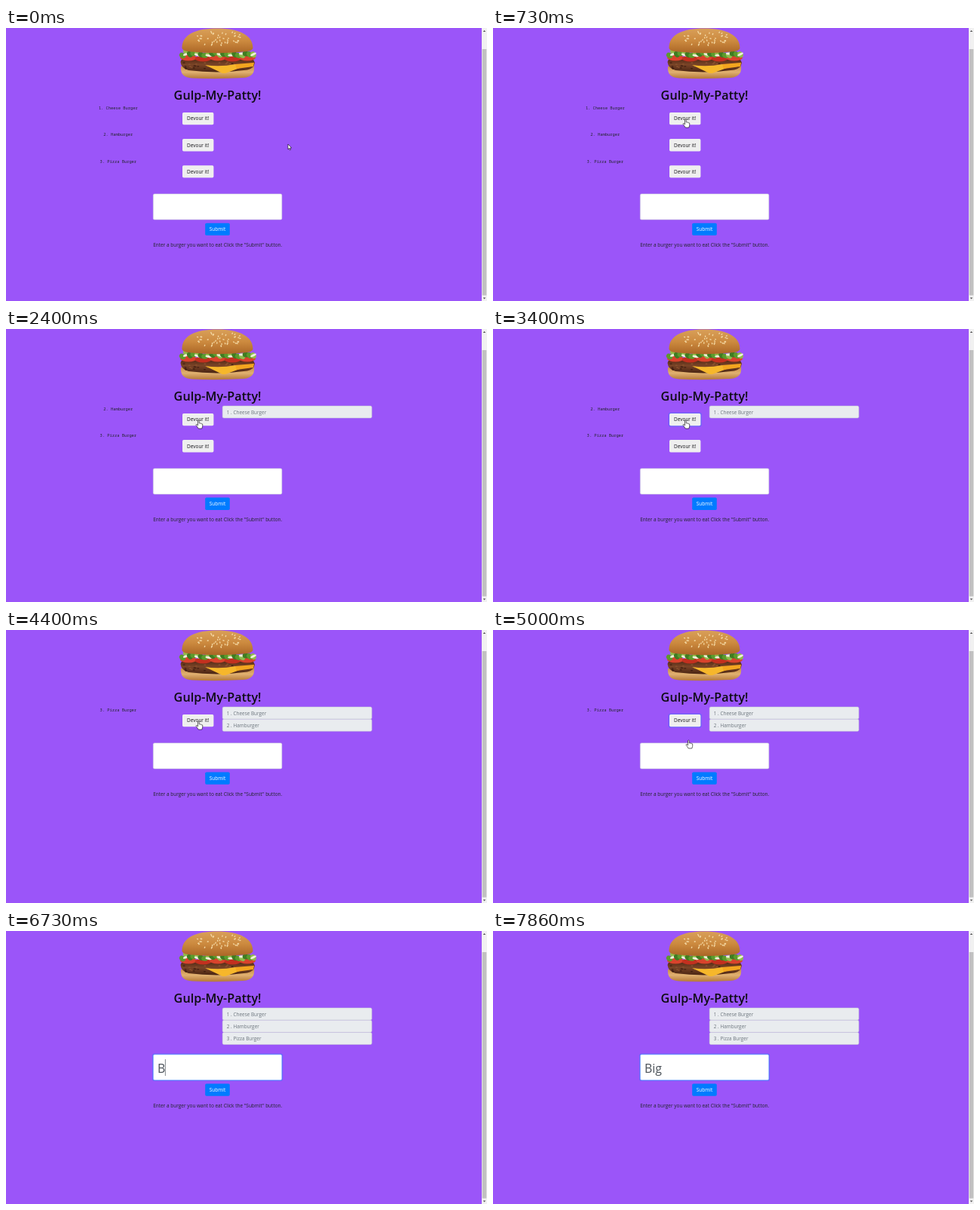
Recreate the animation shown at these times as an HTML page with a canvas. Size 638 by 362 pixels, loop 8000 ms.

```html
<!DOCTYPE html>
<html lang="en">
<head>
<meta charset="utf-8">
<title>Burger list</title>
<style>
html, body { margin: 0; width: 100%; height: 100%; overflow: hidden; background: #9b55f9; }
canvas { display: block; width: 638px; height: 362px; }
</style>
</head>
<body>
<canvas id="stage"></canvas>
<script>
const W = 638, H = 362, LOOP = 8000;
const SANS = '"Open Sans", "Noto Sans", sans-serif';
const MONO = '"Noto Sans Mono", "DejaVu Sans Mono", monospace';
const BURGERS = ['Cheese Burger', 'Hamburger', 'Pizza Burger'];
const CLICKS = [1000, 3060, 4400];
const RELOADS = [1530, 3660, 5060];
const FOCUS = 5600;
const KEYS = [[6660, 'B'], [7060, 'i'], [7260, 'g']];
const PATH = [[260, 374, 154], [730, 254.5, 121], [4660, 254.5, 121], [5000, 258.5, 146], [5330, 262, 172]];

const canvas = document.getElementById('stage');
const ctx = canvas.getContext('2d');
const dpr = window.devicePixelRatio || 1;
canvas.width = W * dpr;
canvas.height = H * dpr;

const clamp = v => Math.max(0, Math.min(1, v));
const mix = (a, b, k) => a + (b - a) * k;
const ease = k => k * k * (3 - 2 * k);
const rgb = (a, b, k) => `rgb(${a.map((v, i) => Math.round(mix(v, b[i], k)))})`;

function seeded(seed) {
  return () => (seed = (seed * 16807) % 2147483647) / 2147483647;
}

// Fonts are set ten times larger and scaled down for fractional advances.
function text(str, x, y, size, color, align = 'left', family = SANS, weight = 400) {
  ctx.save();
  ctx.translate(x, y);
  ctx.scale(0.1, 0.1);
  ctx.font = `${weight} ${size * 10}px ${family}`;
  ctx.textAlign = align;
  ctx.fillStyle = color;
  ctx.fillText(str, 0, 0);
  const width = ctx.measureText(str).width / 10;
  ctx.restore();
  return width;
}

function box(x, y, w, h, fill, stroke, line = 0.5, r = 1.7) {
  ctx.beginPath();
  ctx.roundRect(x, y, w, h, r);
  ctx.fillStyle = fill;
  ctx.fill();
  if (stroke) {
    ctx.strokeStyle = stroke;
    ctx.lineWidth = line;
    ctx.stroke();
  }
}

function ring(x, y, w, h, k) {
  if (k > 0) box(x - 1.3, y - 1.3, w + 2.6, h + 2.6, `rgba(0,123,255,${0.3 * k})`, null, 0, 2.8);
}

function ellipse(x, y, rx, ry, color, turn = 0) {
  ctx.beginPath();
  ctx.ellipse(x, y, rx, ry, turn, 0, Math.PI * 2);
  ctx.fillStyle = color;
  ctx.fill();
}

function shape(d, fill) {
  ctx.fillStyle = fill;
  ctx.fill(new Path2D(d));
}

function shade(y0, y1, ...colors) {
  const g = ctx.createLinearGradient(0, y0, 0, y1);
  colors.forEach((c, i) => g.addColorStop(i / (colors.length - 1), c));
  return g;
}

function burger() {
  const rnd = seeded(77);
  shape('M232 51 C231 61 236 66 247 66.5 Q281 68 315 66 C327 65 330 59 329 50 Z',
    shade(50, 67, '#c98b45', '#e0b070', '#b5793a'));
  shape('M231.5 45 Q232 40 242 39 L320 39 Q329 40 330 46 Q329 54 320 55.5 Q281 61 242 56 Q232 53 231.5 45 Z',
    shade(39, 58, '#4a2413', '#7a4427', '#4b2614'));
  for (let i = 0; i < 24; i++)
    ellipse(236 + rnd() * 90, 45 + rnd() * 9, 1.6, 0.7, i % 2 ? '#8d5430' : '#3c1c10');
  shape('M264 49 Q284 52 304 48 L318 50 L291 60 L287 60 Z', '#f6b72b');
  shape('M304 48 L329 46 L328 51 L306 54 Z', '#f3a51f');
  for (let i = 0; i < 5; i++)
    ellipse(242 + i * 19.5, 39.5 + (i % 2), 11, 4, i % 2 ? '#c3301f' : '#d9432c');
  for (let i = 0; i < 20; i++) {
    const x = 234 + i * 4.95;
    ellipse(x, 31.5 + rnd() * 5, 4.4, 3.4, ['#5c9b2c', '#8fbc4b', '#3f7c22'][i % 3], rnd());
    if (i % 3 === 1) ellipse(x, 34 + rnd() * 2.5, 4.2, 1.5, '#eef0d8', rnd() - 0.5);
  }
  shape('M233.5 27 C233 9 251 0.5 280 0.5 C310 0.5 328 10 327.5 27 Q326 31 315 31.5 Q281 35 246 31.5 Q235 31 233.5 27 Z',
    shade(0, 34, '#d9a05a', '#cc8a3f', '#a96425'));
  for (let i = 0; i < 46; i++) {
    const a = rnd() * Math.PI * 2, r = Math.sqrt(rnd());
    ellipse(281 + Math.cos(a) * r * 37, 13.5 + Math.sin(a) * r * 9.5, 1.25, 0.75, '#f3d7a2', a);
  }
}

function scrollbar() {
  ctx.fillStyle = '#f1f1f1';
  ctx.fillRect(631, 0, 7, H);
  ctx.fillStyle = '#c1c1c1';
  ctx.fillRect(631.7, 28, 5.6, 326.5);
  shape('M632.7 5 L634.5 3 L636.3 5 Z', '#505050');
  shape('M632.7 357.5 L634.5 359.5 L636.3 357.5 Z', '#505050');
}

// Buttons fade from the browser's plain look to the page style after a load.
function button(label, x, y, w, k, from, to, ink) {
  box(x, y, w, 16.3, rgb([239, 239, 239], to, k));
  if (k < 1) box(x + 0.3, y + 0.3, w - 0.6, 15.7, 'transparent', `rgba(118,118,118,${1 - k})`);
  text(label, x + w / 2, y + 10.4, 6.45, rgb(from, ink, k), 'center');
}

function list(t, done, k) {
  BURGERS.slice(done).forEach((name, i) => {
    const y = 112 + i * 35.1;
    text(`${done + i + 1}. ${name}`, 148.8, y - 3.7, 5.4, '#212529', 'center', MONO);
    if (i === 0) ring(234, y, 41.4, 16.3, clamp((t - CLICKS[done]) / 150));
    button('Devour it!', 234, y, 41.4, k, [0, 0, 0], [239, 239, 239], [20, 20, 24]);
  });
  BURGERS.slice(0, done).forEach((name, i) => {
    const y = 102 + i * 16.25;
    box(287.2, y, 198, 16, '#e9ecef', '#c3c8d0');
    text(`${i + 1} . ${name}`, 292.8, y + 10.6, 6.4, '#6c757d');
  });
}

function form(t, top, k) {
  const f = clamp((t - FOCUS) / 150);
  ring(195.3, top, 170.6, 34, f);
  box(195.3, top, 170.6, 34, '#fff', rgb([206, 212, 218], [90, 160, 255], f), 0.6);

  const typed = KEYS.filter(key => t >= key[0]);
  const word = typed.map(key => key[1]).join('');
  const width = text(word, 201, top + 23.9, 15.9, '#495057');
  const since = t - (typed.length ? typed[typed.length - 1][0] : FOCUS + 30);
  if (since >= 0 && since % 1000 < 500) {
    ctx.fillStyle = '#495057';
    ctx.fillRect(200.6 + width, top + 6.3, 0.7, 22);
  }

  button('Submit', 264.2, top + 38.6, 32.6, k, [0, 0, 0], [0, 123, 255], [255, 255, 255]);
  text('Enter a burger you want to eat Click the "Submit" button.', 280.7, top + 70.2, 6.47, '#212529', 'center');
}

function pointer(t) {
  let [, x, y] = PATH[0];
  for (let i = 1; i < PATH.length; i++) {
    const a = PATH[i - 1], b = PATH[i];
    const k = ease(clamp((t - a[0]) / (b[0] - a[0])));
    if (t >= a[0]) { x = mix(a[1], b[1], k); y = mix(a[2], b[2], k); }
  }
  if (t > RELOADS[2] && y > 164) return;
  const hand = t < RELOADS[2] && x < 275.4 && y < 147;
  const d = hand
    ? 'M0 .6 Q.9-.4 1.7 .6 L1.7 4 Q2.7 3.4 3.4 4.3 Q4.4 3.8 5 4.7 Q6.3 4.5 6.3 6 L6.1 8.6 L5.3 11 L.7 11 L-1 8.4 L-2.5 6.2 Q-2.2 5 -1.1 5.7 L0 6.9 Z'
    : 'M0 0 L0 6.9 L1.5 5.5 L2.5 7.9 L3.6 7.4 L2.6 5.1 L4.7 5 Z';
  ctx.save();
  ctx.translate(x, y);
  const path = new Path2D(d);
  ctx.fillStyle = '#fff';
  ctx.fill(path);
  ctx.strokeStyle = '#000';
  ctx.lineWidth = 0.6;
  ctx.stroke(path);
  ctx.restore();
}

function draw(t) {
  const done = RELOADS.filter(r => t >= r).length;
  const k = done ? clamp((t - RELOADS[done - 1] - 70) / 130) : 1;
  ctx.setTransform(dpr, 0, 0, dpr, 0, 0);
  ctx.fillStyle = '#9b55f9';
  ctx.fillRect(0, 0, W, H);
  burger();
  text('Gulp-My-Patty!', 280.6, 95, 16.2, '#0d0b12', 'center', SANS, 600);
  list(t, done, k);
  form(t, done < 3 ? 220.1 - done * 35.1 : 163.8, k);
  scrollbar();
  pointer(t);
}

const start = performance.now();
function tick() {
  draw((performance.now() - start) % LOOP);
  requestAnimationFrame(tick);
}
tick();
</script>
</body>
</html>
```
